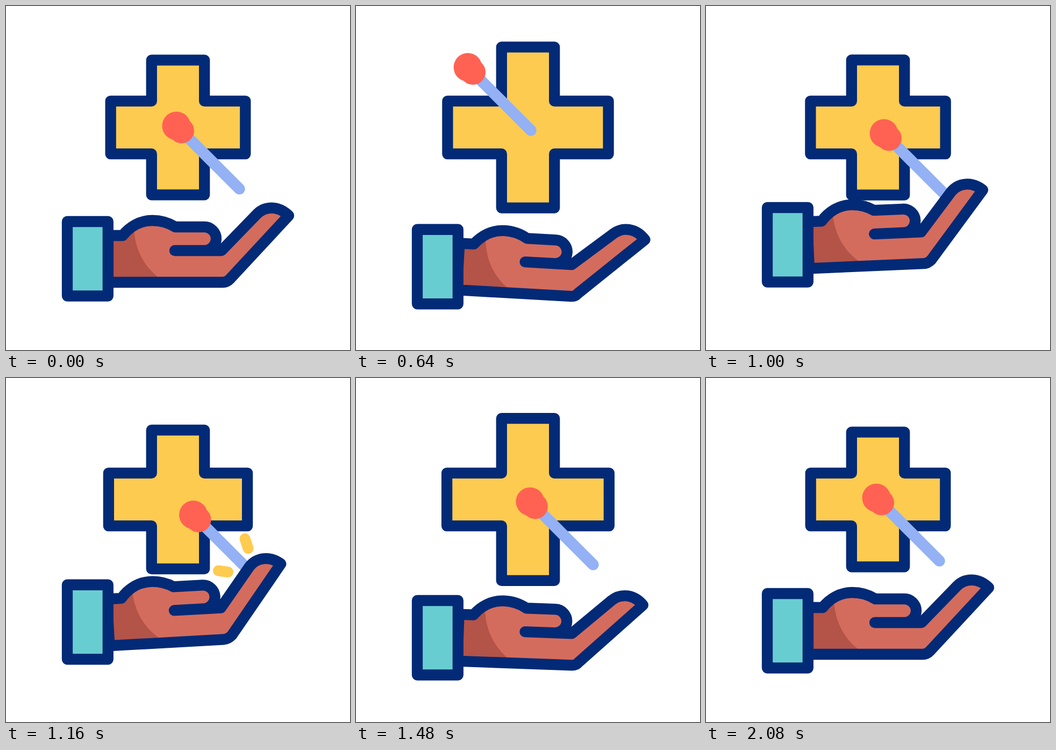
Recreate the animation shown at these times as an HTML page. Size 640 by 640 pixels, loop 3 s.

```html
<!DOCTYPE html>
<html lang="en">
<head>
<meta charset="utf-8">
<title>Helping hand</title>
<style>
  html, body { margin: 0; width: 100%; height: 100%; overflow: hidden; background: #fff; }
  svg { display: block; width: 100%; height: 100%; }
  .line { stroke: #032a76; stroke-width: 20.3; stroke-linejoin: round; stroke-linecap: round; }
  .gold { fill: #fdcb50; }
  .spark { stroke: #fdcb50; stroke-width: 20; stroke-linecap: round; }
  .stick { stroke: #93b1f4; stroke-width: 21; stroke-linecap: round; }
  .bud { fill: #ff6252; }
  .skin { fill: #d46c5d; }
  .shade { fill: #b45348; }
  .cuff { fill: #68cdd1; }
  .none { fill: none; }
</style>
</head>
<body>
<svg viewBox="0 0 640 640">
  <path id="cross" class="line gold"/>
  <g id="swab">
    <path class="stick" d="M327 233 434.3 340.3"/>
    <g class="bud">
      <circle cx="317" cy="223" r="26.5"/>
      <circle cx="326.5" cy="232" r="23.5"/>
    </g>
  </g>
  <line id="sparkA" class="spark"/>
  <line id="sparkB" class="spark"/>
  <g id="arm">
    <path id="skin" class="skin"/>
    <path id="shade" class="shade"/>
    <path id="outline" class="line none"/>
    <rect class="line cuff" x="114" y="401" width="75.8" height="138.5"/>
  </g>
</svg>
<script>
  const LOOP = 3000, ACTIVE = 2080, STEP = 40;
  const $ = id => document.getElementById(id);

  // Keys are [time, value] pairs, eased with a cosine.
  const tracks = {
    cross: [[0, 125.3], [550, 151.8], [1035, 125.3], [1540, 151.8], [2080, 125.3]],
    swab: [[0, 0], [600, -111], [1120, 32], [1640, 0]],
    arm: [[120, 0], [480, 26], [1000, -26], [1480, 13], [2080, 0]],
    bend: [[240, 0], [600, 1], [1120, -1], [1620, 1], [2080, 0]],
    sparkHead: [[1060, 0], [1160, 1]],
    sparkTail: [[1160, 0], [1320, 1]]
  };

  // Points marked "f" belong to the fingers and bend a second time.
  const HAND = 'M190,427 L217,427 C230,411 249,399 272,399 C288,399 302,403 315,411 ' +
    'L369,411 C381,411 391,421 391,433 C391,445 381,455 369,455 L314,455 L401,455 ' +
    'L467,387f C482,372f 507,371f 526,390f L416.5,508f Q411,514 403,514 L190,514 Z';
  const SHADE = 'M190,427 L217,427 L238,408 C238,452 258,490 294,512 L190,514 Z';
  const WRIST = [200, 470], KNUCKLE = [407, 485];

  function value(name, t) {
    const keys = tracks[name];
    if (t <= keys[0][0]) return keys[0][1];
    for (let i = 1; i < keys.length; i++) {
      const [t0, a] = keys[i - 1], [t1, b] = keys[i];
      if (t < t1) return a + (b - a) * (1 - Math.cos(Math.PI * (t - t0) / (t1 - t0))) / 2;
    }
    return keys[keys.length - 1][1];
  }

  function turn([x, y], [cx, cy], deg) {
    const r = deg * Math.PI / 180, c = Math.cos(r), s = Math.sin(r);
    return [cx + (x - cx) * c - (y - cy) * s, cy + (x - cx) * s + (y - cy) * c];
  }

  function bendPath(d, bend) {
    return d.replace(/([\d.]+),([\d.]+)(f?)/g, (_, x, y, finger) => {
      let p = [+x, +y];
      if (finger) p = turn(p, KNUCKLE, 5.4 * bend);
      return turn(p, WRIST, 3.3 * bend).map(n => n.toFixed(2)).join(',');
    });
  }

  function crossPath(reach) {
    const w = 49.2, n = reach - w;
    return `M${320 - w} ${226 - reach}h${2 * w}v${n}h${n}v${2 * w}h${-n}v${n}` +
      `h${-2 * w}v${-n}h${-n}v${-2 * w}h${n}z`;
  }

  function drawSpark(line, x0, y0, x1, y1, t) {
    const head = value('sparkHead', t), tail = value('sparkTail', t);
    const mix = (a, b, k) => a + (b - a) * k;
    line.style.display = head > 0 && tail < 1 ? '' : 'none';
    line.setAttribute('x1', mix(x0, x1, tail));
    line.setAttribute('y1', mix(y0, y1, tail));
    line.setAttribute('x2', mix(x0, x1, head));
    line.setAttribute('y2', mix(y0, y1, head));
  }

  function draw(t) {
    const bend = value('bend', t), shift = value('swab', t);
    const hand = bendPath(HAND, bend);
    $('cross').setAttribute('d', crossPath(value('cross', t)));
    $('swab').setAttribute('transform', `translate(${shift} ${shift})`);
    $('arm').setAttribute('transform', `translate(0 ${value('arm', t)})`);
    $('skin').setAttribute('d', hand);
    $('outline').setAttribute('d', hand);
    $('shade').setAttribute('d', bendPath(SHADE, bend));
    drawSpark($('sparkA'), 450.5, 317, 444.5, 299, t);
    drawSpark($('sparkB'), 413, 361, 395, 358.5, t);
  }

  const start = performance.now();
  function tick() {
    const t = (performance.now() - start) % LOOP;
    draw(Math.min(ACTIVE, Math.floor(t / STEP) * STEP));
    requestAnimationFrame(tick);
  }
  tick();
</script>
</body>
</html>
```
